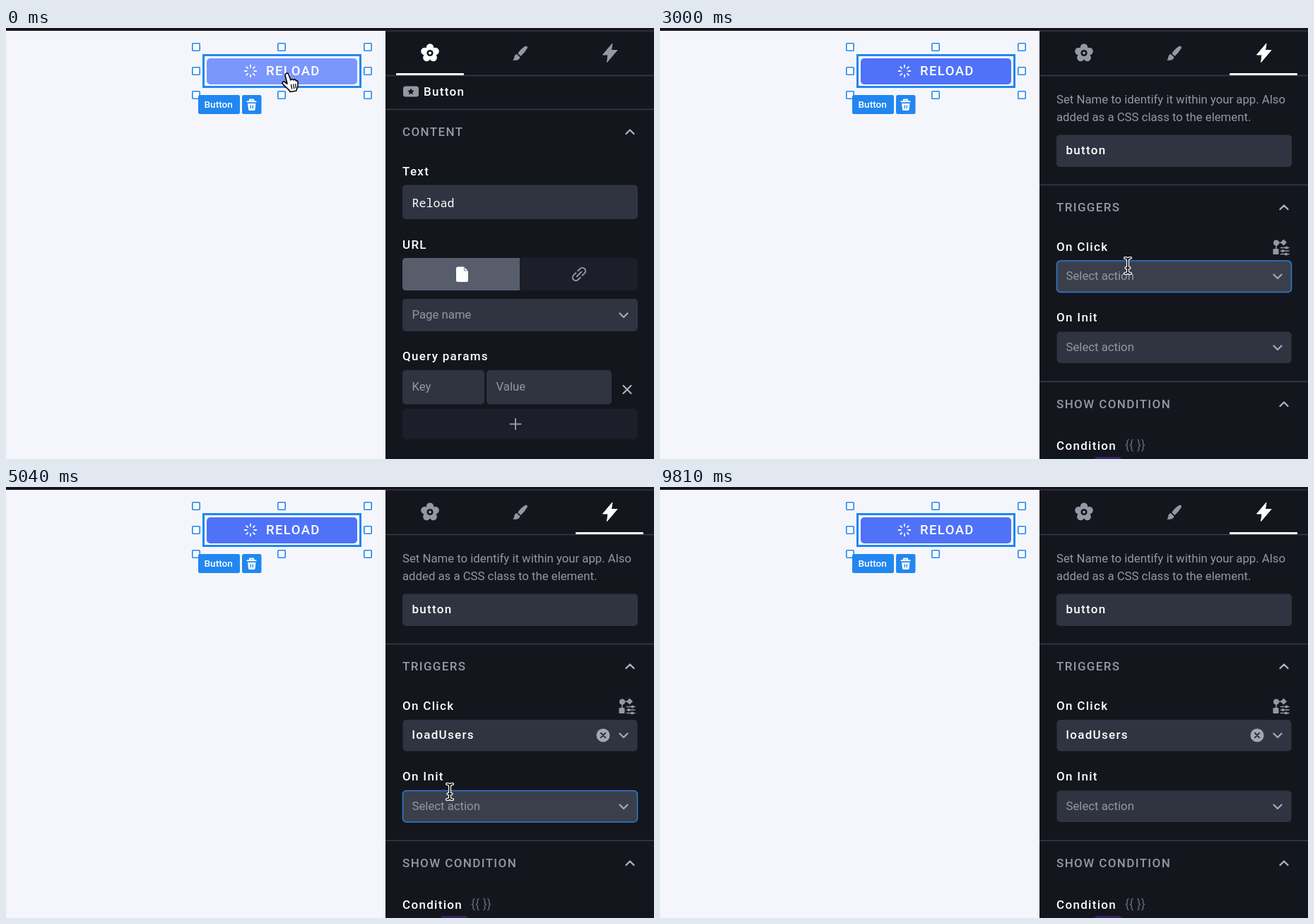
Recreate the animation shown at these times as an HTML page. Size 917 by 611 pixels, loop 9.87 s.

```html
<!DOCTYPE html>
<html lang="en">
<head>
<meta charset="utf-8">
<title>Button action setup</title>
<style>
  html, body { margin: 0; width: 100%; height: 100%; overflow: hidden; background: #14161e; }
  svg { display: block; width: 917px; height: 611px; }
  text { font-family: Roboto, Arial, sans-serif; white-space: pre; }
  .label { font-size: 17px; font-weight: 500; letter-spacing: 1.3px; fill: #fff; }
  .head { font-size: 17px; font-weight: 500; letter-spacing: 1.38px; fill: #9498a5; }
  .hint { font-size: 16.75px; fill: #9297a4; }
  .item { font-size: 16.75px; fill: #f4f5f8; }
  .mono { font: 16.7px "Roboto Mono", "Noto Sans Mono", monospace; fill: #fff; }
  .line { fill: none; stroke-linecap: round; stroke-linejoin: round; }
</style>
</head>
<body>
<svg id="stage" viewBox="0 0 917 611"></svg>
<script>
const LOOP = 9870;
const BLUE = '#2187f0', FIELD = '#2f3440', DARK = '#1c1e29', GREY = '#9498a5', PANEL = '#14161e';

const rect = (x, y, w, h, fill, r = 0, more = '') =>
  `<rect x="${x}" y="${y}" width="${w}" height="${h}" rx="${r}" fill="${fill}" ${more}/>`;
const text = (kind, x, y, s) => `<text class="${kind}" x="${x}" y="${y}">${s}</text>`;
const line = (d, color, w = 2, more = '') =>
  `<path class="line" d="${d}" stroke="${color}" stroke-width="${w}" ${more}/>`;
const shape = (d, fill, more = '') => `<path d="${d}" fill="${fill}" ${more}/>`;
const dot = (x, y, r, fill) => `<circle cx="${x}" cy="${y}" r="${r}" fill="${fill}"/>`;
const group = (id, body, more = '') => `<g id="${id}" ${more}>${body}</g>`;
const rule = y => rect(537, y, 380, 1.5, '#363b46');
const up = (x, y) => line(`M${x - 5.5} ${y + 3}l5.5-5.5 5.5 5.5`, '#b0b4bf', 2.3);
const down = (x, y) => line(`M${x - 5.5} ${y - 2.5}l5.5 5.5 5.5-5.5`, '#a4a8b4', 2.3);
const plus = (x, y, color) => line(`M${x - 7.5} ${y}h15M${x} ${y - 7.5}v15`, color);
const cross = (x, y, r, color) =>
  line(`M${x - r} ${y - r}l${2 * r} ${2 * r}m0 ${-2 * r}l${-2 * r} ${2 * r}`, color);
const section = (y, s) => text('head', 561, y, s) + up(883, y - 6);

function ring(n, radius, draw) {
  let out = '';
  for (let i = 0; i < n; i++) {
    const a = (i / n - 0.25) * 2 * Math.PI;
    out += draw(Math.cos(a) * radius, Math.sin(a) * radius);
  }
  return out;
}

// Canvas area with the selected button
const handles = [27, 61, 95].map(y => [269, 390, 512].map(x =>
  x === 390 && y === 61 ? '' :
    rect(x - 5.2, y - 5.2, 10.4, 10.4, '#fbfcff', 1, `stroke="${BLUE}" stroke-width="1.6"`)
).join('')).join('');

const burst = ring(8, 1, (x, y) => line(`M${346 + x * 5.4} ${61 + y * 5.4}L${346 + x * 8.3} ${61 + y * 8.3}`, '#fff', 1.8));

const canvasArea =
  rect(0, 0, 537, 611, '#f5f6fb') + rect(0, 0, 917, 4, '#17131f') + handles +
  rect(279.5, 38.5, 222, 45, '#f9faff', 0, `stroke="${BLUE}" stroke-width="3"`) +
  rect(284, 43, 213, 37, '#4f72f8', 5, 'id="button"') +
  group('caption', burst + `<text x="368" y="67.3" font-size="18.5" font-weight="500" letter-spacing="1.4" fill="#fff">RELOAD</text>`) +
  group('spinner', line('M0-14A14 14 0 1 0 14 0', '#fff', 3.4, 'stroke-linecap="butt"')) +
  rect(272, 95, 59, 27, BLUE, 2.5) + rect(334, 95, 27.5, 27, BLUE, 2.5) +
  `<text x="280.5" y="113" font-size="13.6" font-weight="500" fill="#fff">Button</text>` +
  line('M341.5 104.2h12M345 103v-1.500h5v1.500', '#fff', 2) +
  shape('M342 107h11.500l-1 8.500q-.2 1.500-1.700 1.500h-6q-1.500 0-1.700-1.500z', '#fff') +
  line('M346.300 110v3.500M349.300 110v3.500', BLUE, 1.4);

// Tab bar shared by both panels
const gear = ring(5, 8, (x, y) => dot(600 + x, 35.5 + y, 5.2, 'currentColor')) +
  dot(600, 35.5, 9, 'currentColor') + dot(600, 35.5, 4.6, PANEL) + dot(600, 35.5, 2, 'currentColor');
const brush = shape('M735.500 25.500q3 0 2.300 3-4 7-9.500 11.500l-4-4q5-7.500 11.200-10.500z', GREY) +
  shape('M722.800 37l4.600 4.600q-1 5.400-10.400 4 2.300-1.500 2.300-4.300 0-3 3.500-4.300z', GREY);
const tabs =
  rect(537, 4, 380, 607, PANEL) + rect(537, 3.5, 380, 1.3, '#363b46') + rule(66.7) +
  group('gear', gear) + brush +
  group('bolt', shape('M858 22L844.500 38H852L850.500 48.500L865 31.500H856.500Z', 'currentColor',
    'stroke="currentColor" stroke-linejoin="round"')) +
  rect(0, 64, 96, 3, '#fff', 1, 'id="bar"');

// Content settings
const star = 'M573 85.300l1.400 3 3.300.400-2.400 2.300.600 3.300-2.900-1.600-2.900 1.600.600-3.300-2.400-2.300 3.300-.400z';
const content =
  rect(562, 82.500, 22, 15, GREY, 3.5) + shape(star, PANEL) +
  text('label', 591, 96, 'Button') + rule(114.7) + section(153, 'CONTENT') +
  text('label', 561, 209, 'Text') + rect(561, 222.500, 333, 48.500, FIELD, 5) + text('mono', 574.500, 253.500, 'Reload') +
  text('label', 561, 312.500, 'URL') +
  rect(561, 326, 333, 46, DARK, 5) + shape('M566 326H727V372H566Q561 372 561 367V331Q561 326 566 326Z', '#585d6c') +
  shape('M639 338.500h9l6 6v13q0 2.500-2.500 2.500h-12q-2.500 0-2.500-2.500v-16.500q0-2.500 2-2.500z', '#fff') +
  line('M648.500 339v5h5', '#858997', 1.2) +
  `<g transform="translate(811 349) rotate(-45)">` +
    line('M-2-4.500h-4.500a4.500 4.500 0 0 0 0 9h4.500M2-4.500h4.500a4.500 4.500 0 0 1 0 9h-4.500M-4.500 0h9', GREY, 2) + '</g>' +
  rect(561, 384, 333, 46, FIELD, 5) + text('hint', 574.500, 412, 'Page name') + down(874, 407) +
  text('label', 561, 471, 'Query params') +
  rect(561, 485, 116, 48.500, FIELD, 5) + text('hint', 574.500, 514, 'Key') +
  rect(680, 485, 177, 48.500, FIELD, 5) + text('hint', 693.500, 514, 'Value') +
  cross(879, 512.500, 5.5, '#b4b8c2') +
  rect(561, 540, 333, 42.500, DARK, 5) + plus(721, 561.500, GREY);

// Trigger settings
const flow = dot(872, 304.500, 4, GREY) + rect(867.500, 313, 8, 8, GREY, 1) +
  shape('M882.500 299.500l4.500 4.500-4.500 4.500-4.500-4.500z', GREY) +
  line('M872 305v9M874 304.300h8M878.500 311.500h11.500M878.500 316h11.500M878.500 320.500h11.500', GREY, 1.6) +
  dot(886.500, 311.500, 2, GREY) + dot(881.500, 316, 2, GREY) + dot(886, 320.500, 2, GREY);
const menu =
  rect(561, 381, 333, 165, '#3e4251', 5) + shape('M566 381H889Q894 381 894 386V417.500H561V386Q561 381 566 381Z', '#31353f') +
  `<text x="639.500" y="404.500" font-size="16" font-weight="500" letter-spacing="1.1" fill="#9b9fab">Add New Action</text>` +
  plus(791, 399.500, '#fff') +
  ['loadUsers', 'updateUser', 'loadArticles'].map((s, i) => text('item', 573, 444 + i * 42.8, s)).join('');
const triggers =
  text('hint', 561, 107, 'Set Name to identify it within your app. Also') +
  text('hint', 561, 131.500, 'added as a CSS class to the element.') +
  rect(561, 151.500, 333, 45.500, FIELD, 5) + text('label', 574.500, 179, 'button') +
  rule(221.700) + section(260, 'TRIGGERS') +
  text('label', 561, 316, 'On Click') + flow +
  rect(561.500, 330, 332, 44.500, FIELD, 5, 'id="click"') +
  group('empty', text('hint', 574.500, 357, 'Select action')) +
  group('chosen', text('label', 574.500, 357, 'loadUsers') + dot(845, 352, 9.5, '#a3a7b3') + cross(845, 352, 3.2, FIELD)) +
  group('closed', down(874, 352)) + group('opened', up(874, 352)) +
  text('label', 561, 416, 'On Init') +
  rect(561.500, 430.500, 332, 44.500, FIELD, 5, 'id="init"') + text('hint', 574.500, 458, 'Select action') + down(874, 453) +
  rule(500.500) + section(539, 'SHOW CONDITION') +
  text('label', 561, 597.500, 'Condition') +
  `<text x="658" y="597" font-size="18" fill="#626672">{{ }}</text>` +
  rect(615, 608, 38, 10, '#3b2366', 4) + group('menu', menu);

// Cursors, with the hot spot at 0,0
const ink = 'stroke="#000" stroke-width="1.6" stroke-linejoin="round"';
const hand = shape('M-3 2C-3-1 1-2 2 1L5 9C6 7 8 7 9 9C10 7 12 8 12.500 10C14 9 15 10 15 12V17C15 20 13 21 13 24L4 25.500C3 22-4 18-6.500 14C-8 11-5 10-3 12L0 14Z', '#fff', ink) +
  line('M5.500 15.500l1.200 5.500M8.700 15l1 5.500M11.700 14.500l.6 5.500', '#000', 1.3);
const beamPath = 'M-4-11Q0-11 0-8V8Q0 11-4 11M4-11Q0-11 0-8M0 8Q0 11 4 11M-2.500 3h5';
const beam = line(beamPath, '#fff', 4.2) + line(beamPath, '#000', 1.6);
const arrow = shape('M0 0V17L4 13.500L6.500 19.500L9.500 18.200L7 12.500H12.500Z', '#000', 'stroke="#fff" stroke-width="1.3"');

stage.innerHTML = canvasArea + tabs + group('content', content) + group('triggers', triggers) +
  group('cursor', group('hand', hand) + group('beam', beam) + group('arrow', arrow));

const $ = id => document.getElementById(id);
const show = (id, on) => $(id).style.display = on ? '' : 'none';
const clamp = v => Math.max(0, Math.min(1, v));
const ease = v => v < 0.5 ? 4 * v ** 3 : 1 - (2 - 2 * v) ** 3 / 2;
const ramp = (t, from, to) => clamp((t - from) / (to - from));
const inside = ([x, y], l, t, r, b) => x >= l && x <= r && y >= t && y <= b;

// Cursor stops: time, x, y
const stops = [
  [0, 398, 65], [30, 398, 65], [800, 852, 38], [2400, 852, 38], [2960, 662, 337], [3500, 662, 337],
  [4150, 652, 393], [4300, 652, 393], [4530, 628, 432], [5640, 628, 432], [6200, 374, 71],
  [6600, 374, 69], [8900, 374, 69], [9480, 425, -32], [LOOP, 425, -32]
];
function cursorAt(t) {
  const i = stops.findIndex(s => s[0] > t);
  const [t0, x0, y0] = stops[i - 1], [t1, x1, y1] = stops[i];
  const k = ease(ramp(t, t0, t1));
  return [x0 + (x1 - x0) * k, y0 + (y1 - y0) * k];
}

function mix(k) {
  const from = [79, 114, 248], to = [123, 150, 252];
  return `rgb(${from.map((v, i) => Math.round(v + (to[i] - v) * k))})`;
}

function field(id, active) {
  $(id).setAttribute('fill', active ? '#3a3f4b' : FIELD);
  $(id).setAttribute('stroke', active ? '#2e7dd6' : 'none');
  $(id).setAttribute('stroke-width', 1.5);
}

function draw(now) {
  const t = now % LOOP;
  const pos = cursorAt(t);
  const onTriggers = t >= 1770, open = t >= 3420 && t < 4770, picked = t >= 4770;
  const loading = t >= 6800 && t < 8700;

  show('content', !onTriggers);
  show('triggers', onTriggers);
  show('menu', open);
  show('opened', open);
  show('closed', !open);
  show('chosen', picked);
  show('empty', !picked);

  const overBolt = inside(pos, 806, 5, 902, 66);
  $('gear').style.color = onTriggers ? GREY : '#fff';
  $('bolt').style.color = onTriggers || overBolt ? '#fff' : GREY;
  $('bar').setAttribute('x', 552 + 254 * ease(ramp(t, 1770, 2100)));

  const overClick = onTriggers && inside(pos, 561, 330, 894, 375);
  const overInit = onTriggers && !open && inside(pos, 561, 430, 894, 475);
  field('click', open || overClick);
  field('init', overInit);

  const hover = t < 3000 ? 1 - ramp(t, 200, 500) : ramp(t, 6180, 6480) - ramp(t, 9080, 9380);
  $('button').setAttribute('fill', mix(hover));
  show('caption', !loading);
  show('spinner', loading);
  $('spinner').setAttribute('transform', `translate(390.5 61.3) rotate(${(t - 7500) * 0.36})`);

  const pointing = inside(pos, 284, 43, 497, 80) || inside(pos, 552, 5, 902, 66) ||
    open && inside(pos, 561, 381, 894, 546);
  const typing = overClick || overInit;
  show('hand', pointing);
  show('beam', typing && !pointing);
  show('arrow', !typing && !pointing);
  $('cursor').setAttribute('transform', `translate(${pos})`);
  requestAnimationFrame(tick);
}
const tick = () => draw(performance.now());
tick();
</script>
</body>
</html>
```
